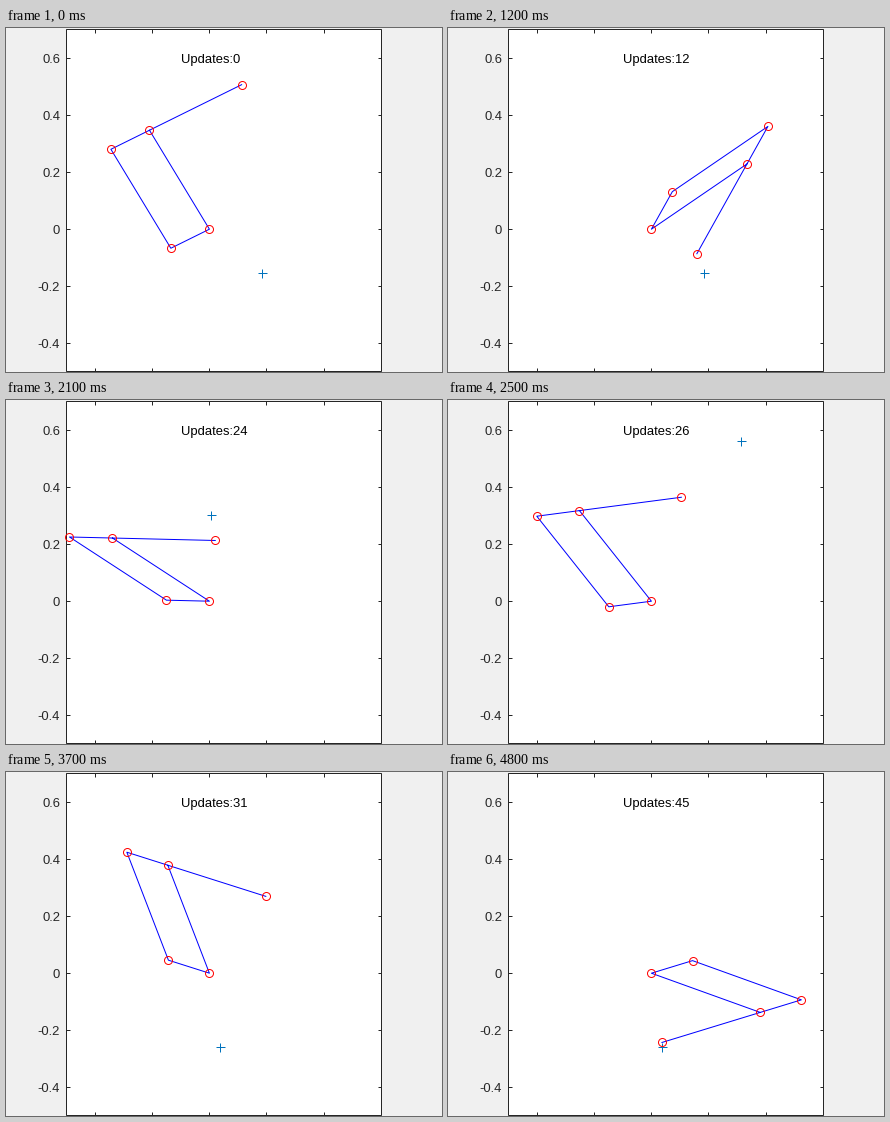
A matplotlib script that plays this animation: 436 px wide and 344 px high, repeating every 4900 ms.

```python
import numpy as np
import matplotlib.pyplot as plt
from matplotlib.animation import FuncAnimation
from matplotlib.patches import Rectangle

W, H, DPI = 436, 344, 100
FRAMES, INTERVAL = 49, 100
PX = 72 / DPI                      # one pixel in points
UNIT = 285.5                       # pixels per data unit
BASE = np.array([203.4, 201.2])
ARM, SHORT, FORE = 115.7, 43.0, 102.8
LEFT, RIGHT, TOP, BOTTOM = 60, 375, 1, 343
INK = "#262626"

START = np.radians([121.2, 26.3])  # arm and forearm angles
TARGETS = np.array([(256, 245), (205.4, 115.4), (293, 41), (214, 275)])
SUBSTEPS = 8
STEP = 0.05 * UNIT / SUBSTEPS      # hand travel per substep
REACHED = 3.6                      # distance that counts as arrival
STALE = np.radians(11)             # joint travel before the Jacobian is renewed

plt.rcParams["font.family"] = "Liberation Sans"
fig = plt.figure(figsize=(W / DPI, H / DPI), dpi=DPI, facecolor="#f0f0f0")
ax = fig.add_axes([0, 0, 1, 1])
ax.set_xlim(0, W)
ax.set_ylim(H, 0)
ax.axis("off")


def rule(x, y):
    ax.plot(x, y, color=INK, lw=PX, zorder=2, solid_capstyle="butt")


def draw_axes():
    ax.add_patch(Rectangle((LEFT, TOP), RIGHT - LEFT, BOTTOM - TOP,
                           fc="white", ec=INK, lw=PX, zorder=1))
    for k in range(-2, 3):
        x = round(BASE[0] + k * 0.2 * UNIT)
        rule([x, x], [TOP, TOP + 4])
        rule([x, x], [BOTTOM - 3, BOTTOM])
    for k in range(-2, 4):
        y = round(BASE[1] - k * 0.2 * UNIT)
        rule([LEFT, LEFT + 4], [y, y])
        rule([RIGHT - 3, RIGHT], [y, y])
        label = f"{k * 0.2:.1f}" if k else "0"
        ax.text(54, y + 5, label, ha="right", va="baseline",
                fontsize=13 * PX, color=INK)


def polar(r, angle):
    return r * np.array([np.cos(angle), -np.sin(angle)])


def pose(q):
    """Base, short joint, corner, elbow and hand."""
    elbow = BASE + polar(ARM, q[0])
    back = polar(-SHORT, q[1])
    return np.array([BASE, BASE + back, elbow + back, elbow,
                     elbow + polar(FORE, q[1])])


def jacobian(q):
    quarter = np.pi / 2
    return np.column_stack([polar(ARM, q[0] + quarter),
                            polar(FORE, q[1] + quarter)])


def simulate():
    """Chase the targets at constant speed with a Jacobian renewed on demand."""
    q, goal, updates = START.copy(), 0, 0
    known, jac = q.copy(), jacobian(q)
    states = []
    for _ in range(FRAMES):
        states.append((q.copy(), goal, updates))
        for _ in range(SUBSTEPS):
            gap = TARGETS[goal] - pose(q)[-1]
            if np.hypot(*gap) < REACHED and goal < len(TARGETS) - 1:
                goal += 1
                gap = TARGETS[goal] - pose(q)[-1]
            q += np.linalg.solve(jac, STEP * gap / np.hypot(*gap))
            if np.abs(q - known).max() > STALE:
                known, jac = q.copy(), jacobian(q)
                updates += 1
    return states


draw_axes()
states = simulate()
links, = ax.plot([], [], color="blue", lw=PX, zorder=3)
joints, = ax.plot([], [], "o", mfc="none", mec="red", ms=8 * PX,
                  mew=PX, zorder=4)
cross, = ax.plot([], [], "+", color="#0072bd", ms=9 * PX, mew=PX, zorder=3)
title = ax.text(175, 35.5, "", va="baseline", fontsize=13 * PX,
                color="black", zorder=5)


def update(i):
    q, goal, updates = states[i]
    p = pose(q)
    links.set_data(*p[[3, 0, 1, 2, 4]].T)
    joints.set_data(*p.T)
    cross.set_data(*TARGETS[goal:goal + 1].T)
    title.set_text(f"Updates:{updates}")
    return links, joints, cross, title


anim = FuncAnimation(fig, update, frames=FRAMES, interval=INTERVAL,
                     repeat=True, repeat_delay=0)
plt.show()
```
